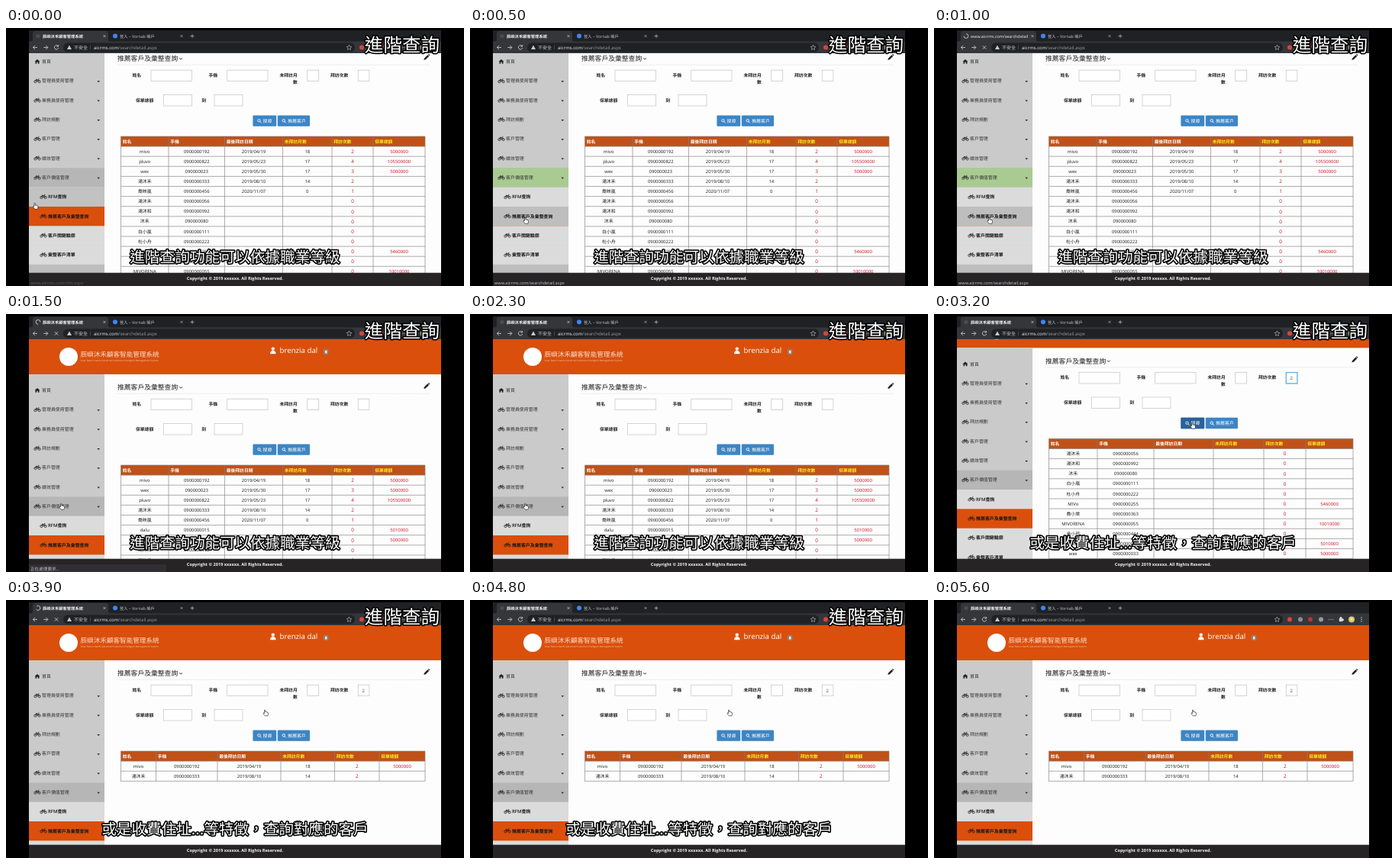
An HTML page for the animation above (5.7 s loop, 600x338 px).

```html
<!DOCTYPE html>
<html lang="zh-TW">
<head>
<meta charset="utf-8">
<title>進階查詢</title>
<style>
html, body { margin: 0; width: 100%; height: 100%; overflow: hidden; background: #000; }
svg { display: block; width: 100vw; height: 100vh; }
text { font-family: "Open Sans", "Noto Sans CJK TC", "Noto Sans CJK JP", "Noto Sans CJK", sans-serif; white-space: pre; text-rendering: geometricPrecision; }
.caption text { font-family: "Noto Sans CJK TC", "Noto Sans CJK JP", "Noto Sans CJK", sans-serif; font-weight: 500; fill: #fff; stroke: #000; stroke-width: 3.2; stroke-linejoin: round; paint-order: stroke; }
</style>
</head>
<body>
<svg id="stage" viewBox="0 0 600 338"></svg>
<script>
const LOOP = 5700;
const ORANGE = '#da4f0b', INK = '#1c1c1c', RED = '#cb0a20';

// Markup helpers; text is placed by its vertical middle.
const rect = (x, y, w, h, fill, extra = '') =>
  `<rect x="${x}" y="${y}" width="${w}" height="${h}" fill="${fill}" ${extra}/>`;
const dot = (x, y, r, fill, extra = '') => `<circle cx="${x}" cy="${y}" r="${r}" fill="${fill}" ${extra}/>`;
const line = (d, color, width = 0.7, extra = '') =>
  `<path d="${d}" fill="none" stroke="${color}" stroke-width="${width}" ${extra}/>`;
const text = (x, y, str, size, fill = INK, extra = '') =>
  `<text x="${x}" y="${(y + size * 0.36).toFixed(2)}" font-size="${size}" fill="${fill}" ${extra}>${str}</text>`;
const group = (id, body, extra = '') => `<g id="${id}" ${extra}>${body}</g>`;
const MID = 'text-anchor="middle"', BOLD = 'font-weight="700"', SEMI = 'font-weight="600"';

// Browser frame
function browser() {
  const cross = (x, y, r, c, w) => line(`M${x - r} ${y - r}l${2 * r} ${2 * r}m0 ${-2 * r}l${-2 * r} ${2 * r}`, c, w);
  const extensions = [[466, '#d8443c'], [480, '#8d8f92'], [493, '#b8392f'], [507, '#9a9c9f']]
    .map(([x, c]) => dot(x, 25.5, 3, c)).join('');
  return rect(30, 3, 540, 335, '#1f2124') +
    '<path d="M32 18q3 0 3-3V7q0-3 3-3h93q3 0 3 3v8q0 3 3 3z" fill="#35363a"/>' +
    rect(30, 17.5, 540, 16, '#35363a') +
    group('favicon', dot(42, 10.5, 2.6, '#4a4c50')) +
    group('spinner', line('M42 7.6a2.9 2.9 0 1 1-2.9 2.9', '#c9cdd2', 0.9)) +
    group('tabName', text(48, 10.6, '辰嶼沐禾顧客管理系統', 5.3, '#f1f3f4', SEMI)) +
    group('tabUrl', text(48, 10.6, 'www.aicrms.com/searchdetail', 5.4, '#f1f3f4')) +
    cross(129, 10.6, 1.5, '#cfd2d6') +
    dot(143, 10.5, 3, '#4285f4') + text(149, 10.6, '登入 – Vornab 帳戶', 5.3, '#c4c7cb') +
    cross(230, 10.6, 1.5, '#b5b8bc') + line('M241.5 10.6h5m-2.5-2.5v5', '#c4c7cb') +
    line('M41 25.5h-5.5m2.5-2.6l-2.6 2.6l2.6 2.6', '#d5d8dc', 0.8) +
    line('M49.3 25.5h5.5m-2.5-2.6l2.6 2.6l-2.6 2.6', '#d5d8dc', 0.8) +
    group('reload', line('M68 23.5a2.7 2.7 0 1 0 .7 2.6M68.6 22v2.2h-2.2', '#d5d8dc', 0.8)) +
    group('stop', cross(66, 25.5, 2.2, '#d5d8dc', 0.8)) +
    rect(75, 19.6, 382, 12, '#202124', 'rx="6"') +
    '<path d="M83 22.6l3 5.4h-6z" fill="#c6c9cd"/>' +
    text(89, 25.5, '不安全', 6, '#c6c9cd') + rect(110, 22.5, 0.5, 6, '#6a6d71') +
    text(115, 25.5, 'aicrms.com<tspan fill="#999da2">/searchdetail.aspx</tspan>', 6, '#f1f3f4') +
    line('M449.5 22.2l1 2.1 2.3.3-1.7 1.6.4 2.3-2-1.1-2 1.1.4-2.3-1.7-1.6 2.3-.3z', '#c6c9cd', 0.6) +
    extensions + [517.5, 520, 522.5].map(x => dot(x, 25.5, 0.8, '#8d8f92')).join('') +
    rect(530.8, 23.6, 4.6, 4.6, '#d5d8dc') + dot(533, 23.2, 1.2, '#d5d8dc') + dot(535.8, 26, 1.2, '#d5d8dc') +
    dot(547, 25.5, 4, '#d9c95a') + dot(547, 25, 1.7, '#efe9cf') +
    [23, 25.5, 28].map(y => dot(560, y, 0.7, '#d5d8dc')).join('');
}

// Sidebar
const STEP = 25.3;
const bike = (x, y) => `<g transform="translate(${x} ${y})">` +
  dot(-2.6, 0.9, 1.6, 'none', `stroke="${INK}" stroke-width=".75"`) +
  dot(2.6, 0.9, 1.6, 'none', `stroke="${INK}" stroke-width=".75"`) +
  line('M-2.6.9l1.3-2.5h2.6l1.3 2.5M-1.3-1.6l1.3 2.5l1.4-2.6M-2-2h1.4M1.2-2.6h1.3', INK, 0.75) + '</g>';

function sidebar() {
  const rowTop = i => 87.6 + STEP * i;
  const items = ['首頁', '管理員使用管理', '業務員使用管理', '拜訪規劃', '客戶管理', '績效管理', '客戶價值管理'];
  const subs = ['RFM查詢', '推薦客戶及彙整查詢', '客戶關鍵輪廓', '彙整客戶清單'];
  const rowFill = (i, fill, id) => rect(30, rowTop(i), 99, STEP, fill, id ? `id="${id}"` : '');
  let out = rect(30, 79, 99, 330, '#cacaca') + rowFill(6, '#b6b6b6') + rowFill(6, '#a9cb92', 'parentHover');
  subs.forEach((_, i) => { out += rowFill(7 + i, '#dbdbdb'); });
  out += rowFill(7, '#c2c2c2', 'rfmHover') + rowFill(8, ORANGE) + rowFill(8, '#bebebe', 'rowHover') + rowFill(11, '#bdbdbd');
  items.forEach((name, i) => {
    const y = 100 + STEP * i;
    out += text(47, y, name, 5.95, '#333');
    out += i === 0
      ? `<path d="M41 ${y - 3}l3.4 3h-.9v2.8h-1.7v-2h-1.6v2h-1.7v-2.8h-.9z" fill="#222"/>`
      : bike(41, y) + `<path d="M119.4 ${y}h3.6l-1.8 2z" fill="#222"/>`;
  });
  subs.forEach((name, i) => {
    const y = 100 + STEP * (7 + i);
    out += bike(49, y) + text(55, y, name, 5.95, '#161616', SEMI);
  });
  return out;
}

// Page header and search form
function header() {
  return rect(30, 33, 540, 46, ORANGE) + dot(82, 56, 12, '#fff') +
    text(97.5, 53, '辰嶼沐禾顧客智能管理系統', 8.6, '#fbe0d2', 'font-weight="300"') +
    text(97.5, 61, 'Clear Dawn Islands Advanced Customer Intelligent Management System', 3.05, '#f7cfba') +
    dot(349.8, 45.6, 2.2, '#fff') + '<path d="M346 52.3q0-4.4 3.8-4.4t3.8 4.4z" fill="#fff"/>' +
    text(358.5, 48, 'brenzia dal', 9.7, '#fff') +
    rect(416, 46, 6.4, 7, '#8d8580', 'rx="2"') + rect(418, 48, 2.4, 3.4, '#f1ece8');
}

const magnifier = (x, y) => dot(x - 0.5, y - 0.5, 1.7, 'none', 'stroke="#fff" stroke-width=".9"') +
  line(`M${x + 0.8} ${y + 0.8}l1.7 1.7`, '#fff', 1);

function form() {
  const label = (x, y, str) => text(x, y, str, 5.8, '#222', BOLD);
  const input = (x, y, w) => rect(x, y, w, 14.4, '#fff', 'stroke="#c4c4c4" stroke-width=".7"');
  return text(146, 96, '推薦客戶及彙整查詢', 8.8, '#222') + line('M227 95.3l1.9 1.9l1.9-1.9', '#333', 1) +
    line('M146 104.3H556', '#c9c9c9', 0.6, 'stroke-dasharray="1 1"') +
    '<path d="M547.3 98l.8-2.5 4.3-4.3 1.8 1.8-4.3 4.3zM552.9 90.7l.9-.8 1.7 1.7-.8.9z" fill="#222"/>' +
    label(165.5, 118, '姓名') + input(190, 111.2, 53.3) +
    label(265.5, 118, '手機') + input(289.7, 111.2, 53.3) +
    label(358.5, 118, '未拜訪月') + label(376, 127, '數') + input(394.7, 111.2, 15) +
    label(425, 118, '拜訪次數') + input(461.3, 111.2, 14.6) +
    group('focus', rect(461.3, 111.2, 14.6, 14.4, '#fff', 'stroke="#66afe9" stroke-width="1.3"')) +
    group('typed', text(468.2, 118.6, '2', 6, '#444', MID)) +
    label(170, 151, '保單總額') + input(206.3, 143.6, 37.2) +
    label(256.2, 151, '到') + input(273, 143.6, 37) +
    rect(323.4, 170.4, 30.8, 14.4, '#3d85c4', 'rx="1"') +
    rect(323.4, 170.4, 30.8, 14.4, '#2a6299', 'rx="1" id="buttonHover"') +
    rect(355.8, 170.4, 42.2, 14.4, '#3d85c4', 'rx="1"') +
    magnifier(332, 177.8) + text(336.6, 177.8, '搜尋', 6, '#fff') +
    magnifier(364.3, 177.8) + text(369, 177.8, '推薦客戶', 6, '#fff');
}

// name | phone | last visit | months | visits | amount
const CLIENTS = {
  mivo: 'mivo|0900000192|2019/04/19|18|2|5000000',
  pluvo: 'pluvo|0900000822|2019/05/23|17|4|105500000',
  wex: 'wex|090000023|2019/05/30|17|3|5000000',
  tang: '湯沐禾|0900000333|2019/08/10|14|2|',
  qiao: '喬映嵐|0900000456|2020/11/07|0|1|',
  tang2: '湯沐禾|0900000056|||0|',
  tang3: '湯沐和|0900000992|||0|',
  muhe: '沐禾|090000080|||0|',
  bai: '白小嵐|0900000111|||0|',
  du: '杜小舟|0900000222|||0|',
  mivo2: 'MIVo|0900000255|||0|5460000',
  tan: '喬小棠|0900000363|||0|',
  mivorena: 'MIVORENA|0900000055|||0|10010000',
  xin: '辛小荷|0900000444|||0|',
  dalu: 'dalu|0900000015|||0|5010000',
  wex2: 'wex|0900000033|||0|5000000'
};
const HEADS = ['姓名', '手機', '最後拜訪日期', '未拜訪月數', '拜訪次數', '保單總額'];
const ROW = 13.1, TABLE_TOP = 198;

function table(id, edges, keys) {
  const bottom = TABLE_TOP + ROW * (keys.length + 1);
  let out = rect(150.5, TABLE_TOP, 398.5, ROW, '#bf5119');
  HEADS.forEach((name, c) => {
    out += text(edges[c] + 2.2, TABLE_TOP + ROW / 2, name, 5.8, c > 2 ? '#ffee1c' : '#fff', BOLD);
  });
  keys.forEach((key, r) => CLIENTS[key].split('|').forEach((cell, c) => {
    const x = (edges[c] + edges[c + 1]) / 2, y = TABLE_TOP + ROW * (r + 1.5);
    if (cell) out += text(x, y, cell, c === 4 ? 6.4 : 5.9, c > 3 ? RED : INK, MID + (c > 3 ? ' font-weight="500"' : ''));
  }));
  let grid = edges.map(x => `M${x} ${TABLE_TOP}V${bottom}`).join('');
  for (let r = 0; r <= keys.length + 1; r++) grid += `M150.5 ${TABLE_TOP + ROW * r}H549`;
  return group(id, out + line(grid, '#858080', 0.65));
}

const wide = [150.5, 213, 286.5, 362.5, 427, 481, 549];
const unvisited = ['tang2', 'tang3', 'muhe', 'bai', 'du', 'mivo2', 'tan', 'mivorena', 'xin', 'dalu', 'wex2'];
const tables =
  table('tableFirst', wide, ['mivo', 'pluvo', 'wex', 'tang', 'qiao', ...unvisited]) +
  table('tableFresh', wide, ['mivo', 'wex', 'pluvo', 'tang', 'qiao', 'dalu', 'wex2', 'tang3', 'tang2', 'muhe']) +
  table('tableZero', [150.5, 214, 288, 366, 432, 487, 549], unvisited) +
  table('tableFound', [150.5, 196.5, 277, 360, 430.5, 489, 549], ['mivo', 'tang']);

const footer = rect(30, 320.7, 540, 17.3, '#272425') +
  text(300, 328, 'Copyright © 2019 xxxxxx. All Rights Reserved.', 5.6, '#f2f2f2', MID + ' ' + BOLD) +
  group('status', group('statusBox', rect(30, 329, 179, 9, '#2f2f31', 'stroke="#454547" stroke-width=".5"')) +
    '<text id="statusText" x="32" y="335.7" font-size="5.6" fill="#c3c5cc"></text>');

const hand = group('cursor',
  '<path transform="scale(.88)" d="M-1.7 1V-3.2q0-.9.8-.9t.8.9v2.4q.2-.5.8-.5t.8.7q.2-.4.8-.3t.7.8q.9-.2.9.8v1.8q0 1.2-.8 2.4h-3.8q-1.6-1.7-2.6-3.5-.3-.9.4-1.1t1.2.7z" fill="#fff" stroke="#111" stroke-width=".7" stroke-linejoin="round"/>');

document.getElementById('stage').innerHTML =
  '<clipPath id="view"><rect x="30" y="33" width="540" height="305"/></clipPath>' +
  rect(0, 0, 600, 338, '#000') + browser() +
  '<g clip-path="url(#view)">' + rect(30, 33, 540, 305, '#fdfdfd') +
  group('page', header() + sidebar() + form() + tables) + footer + '</g>' + hand +
  group('title', text(519, 22.5, '進階查詢', 24.6, '#fff', MID), 'class="caption"') +
  group('lineOne', text(300, 300, '進階查詢功能可以依據職業等級', 19.7, '#fff', MID), 'class="caption"') +
  group('lineTwo', text(300, 300, '或是收費住址...等特徵，查詢對應的客戶', 19.6, '#fff', MID), 'class="caption"');

// Timeline, in ms
const RELOADED = 1400, CUT = 2700, FOUND = 3800, END = 5500;
const el = id => document.getElementById(id);
const show = (id, on) => el(id).setAttribute('visibility', on ? 'visible' : 'hidden');
const fade = (id, v) => el(id).setAttribute('opacity', v);
const ramp = (t, from, to) => Math.min(1, Math.max(0, (t - from) / (to - from)));
const ease = k => k * k * (3 - 2 * k);
const glide = (a, b, k) => a.map((v, i) => v + (b[i] - v) * ease(k));

function pointer(t) {
  if (t < CUT) return glide([38.5, 233], [73, 252], ramp(t, 0, 400));
  return t < FOUND ? glide([455, 95], [339, 146], ramp(t, CUT, 3100)) : [340, 147.5];
}

function render(t) {
  const first = t < RELOADED, zero = t >= CUT && t < FOUND, found = t >= FOUND;
  el('page').setAttribute('transform', `translate(0 ${first ? -56 : zero ? -34.6 : 0})`);
  show('tableFirst', first);
  show('tableFresh', !first && t < CUT);
  show('tableZero', zero);
  show('tableFound', found);

  const hover = first ? ramp(t, 50, 300) : 0;
  fade('parentHover', hover);
  fade('rowHover', hover);
  fade('rfmHover', first ? 1 - hover : 0);
  show('focus', zero);
  show('typed', t >= 2800);
  show('buttonHover', zero && t >= 3050);

  const loading = (t >= 600 && t < 1800) || (t >= 3400 && t < 4200);
  const naming = t >= 600 && first;
  show('spinner', loading);
  show('favicon', !loading);
  show('stop', loading);
  show('reload', !loading);
  show('tabUrl', naming);
  show('tabName', !naming);
  el('spinner').setAttribute('transform', `rotate(${t * 0.36} 42 10.5)`);

  el('statusText').textContent = !first ? '正在處理要求…'
    : t < 100 ? 'www.aicrms.com/rfm.aspx' : 'www.aicrms.com/searchdetail.aspx';
  fade('status', first ? 0.35 + 0.65 * ramp(t, 0, 300) : 1 - ramp(t, 1850, 2050));
  fade('statusBox', first ? 0 : 1);

  el('cursor').setAttribute('transform', `translate(${pointer(t).join(' ')})`);
  show('title', t < END);
  show('lineOne', t < CUT);
  show('lineTwo', t >= CUT && t < END);
}

const start = performance.now();
function tick() {
  render((performance.now() - start) % LOOP);
  requestAnimationFrame(tick);
}
tick();
</script>
</body>
</html>
```
